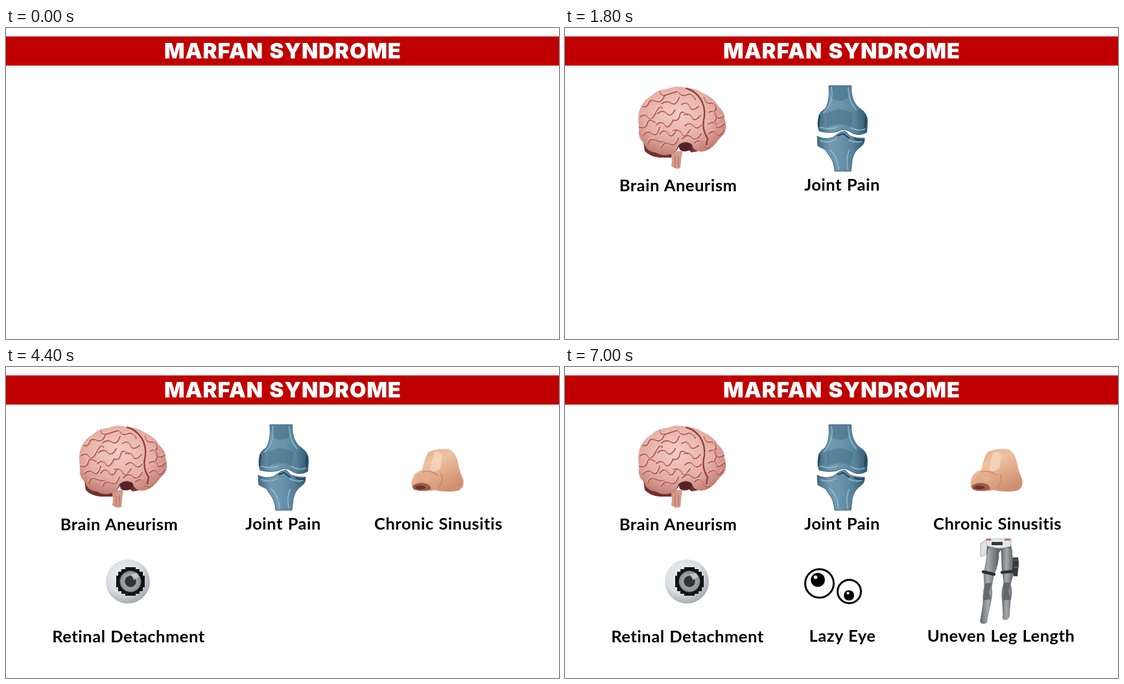
These frames come from a looping animation (853x480 px, 8 s). An HTML page:

```html
<!DOCTYPE html>
<html lang="en">
<head>
<meta charset="utf-8">
<title>Marfan syndrome</title>
<style>
  html, body { margin: 0; width: 100%; height: 100%; overflow: hidden; background: #fff; }
  svg { display: block; width: 100vw; height: 100vh; }
  text { text-anchor: middle; }
  .title { font: 900 33px Inter, sans-serif; letter-spacing: .9px; word-spacing: 2px; fill: #fff; }
  .label { font: 700 25.5px Lato, sans-serif; letter-spacing: .5px; word-spacing: 1px; }
  .line { fill: none; stroke-linecap: round; stroke-linejoin: round; }
  [data-at] { visibility: hidden; }
</style>
</head>
<body>
<svg viewBox="0 0 853 480">
  <defs>
    <radialGradient id="brainFill" cx=".45" cy=".38" r=".65">
      <stop offset="0" stop-color="#f3cdc3"/><stop offset=".6" stop-color="#e5b0a6"/><stop offset="1" stop-color="#bf7a70"/>
    </radialGradient>
    <linearGradient id="boneFill">
      <stop offset="0" stop-color="#3f6a84"/><stop offset=".25" stop-color="#7199b0"/>
      <stop offset=".5" stop-color="#6a94ac"/><stop offset=".75" stop-color="#56829c"/><stop offset="1" stop-color="#2f566f"/>
    </linearGradient>
    <linearGradient id="noseFill" x2=".6" y2="1">
      <stop offset="0" stop-color="#dba585"/><stop offset=".4" stop-color="#efc2a2"/><stop offset="1" stop-color="#d08f70"/>
    </linearGradient>
    <radialGradient id="noseTip">
      <stop offset="0" stop-color="#e8b292"/><stop offset="1" stop-color="#d6997a" stop-opacity="0"/>
    </radialGradient>
    <radialGradient id="ballFill" cx=".4" cy=".35" r=".65">
      <stop offset="0" stop-color="#eef0f3"/><stop offset=".65" stop-color="#d8dbe0"/><stop offset="1" stop-color="#a9adb4"/>
    </radialGradient>
    <radialGradient id="irisFill">
      <stop offset=".4" stop-color="#85898d"/><stop offset="1" stop-color="#34373a"/>
    </radialGradient>
    <linearGradient id="legFill">
      <stop offset="0" stop-color="#5f6469"/><stop offset=".4" stop-color="#a6abb0"/><stop offset="1" stop-color="#5b6065"/>
    </linearGradient>
    <clipPath id="brainClip"><use href="#brainShape"/></clipPath>
  </defs>

  <rect y="13" width="853" height="45" fill="#c00000"/>
  <text class="title" x="427" y="46.5">MARFAN SYNDROME</text>

  <g data-at="500">
    <path d="M121 176L123 190Q132 199 146 200L164 200L180 178L195 192L206 190L196 170Z" fill="#74302f"/>
    <path d="M163 190Q166 204 164 213Q170 219 178 216Q179 203 181 190Z" fill="#d39a8c"/>
    <path class="line" d="M170 199V215M175 199V214" stroke="#b0665c"/>
    <path id="brainShape" fill="url(#brainFill)" d="M113 141C113 124 121 111 134 104Q142 95 158 94Q170 88 186 92Q202 93 212 100Q229 107 236 120Q247 130 246 140Q251 154 245 164Q238 170 232 179Q222 190 210 191Q198 190 196 181Q185 173 176 180L169 193Q154 200 139 192Q126 191 122 178Q112 169 114 157Z"/>
    <g clip-path="url(#brainClip)">
      <g id="folds" class="line" stroke="#b45f5a" stroke-width="1.9">
        <path d="M120 121q7 2 9-5t11-3t13-8M146 98q2 8 11 5t16-5M116 137q7-6 12 1t12-7t10-7M115 153q10 3 12-6t12-1M121 165q7-8 14-2t11-10M128 179q2-10 12-6t13 2M143 132q8-7 14 0t13-6M141 149q8-7 13 1t13-8M146 164q7-10 13-1t12-5M149 184q5-10 13-5t13-9M149 117q8-6 15-1t12-9M166 142q9 3 11-7t12-1M167 158q9-3 13 5t13-6"/>
        <path d="M175 99q6 8 13 4t13 7M180 118q8-6 12 3t14 0M184 134q8-4 12 4t13-3M185 151q7-7 13 0t12-1M181 171q8-9 15-2t14-6M200 177q8-7 12 1t11 7M214 107q3 10 11 9t8 11M222 130q8-5 11 4t12 2M221 148q10-6 12 2t13-2M222 163q8-7 12 0t10-4M232 124q-3 8 0 12t-3 10"/>
      </g>
      <use href="#folds" x="-1.5" y="-2" opacity=".35" style="filter:brightness(2.2)"/>
      <path class="line" d="M187 93C207 99 217 117 215 137Q210 155 220 170L218 180" stroke="#963f40" stroke-width="2.4"/>
    </g>
    <path d="M175 181Q186 172 196 180L193 188Q184 193 177 188Z" fill="#552329"/>
    <text class="label" x="174.5" y="252">Brain Aneurism</text>
  </g>

  <g data-at="1800">
    <g fill="url(#boneFill)" stroke="#3a637c">
      <path d="M407 89H441.5C441 108 447 119 456 125Q467 132 466.500 145L465.500 161Q455 167 445 163L436 158Q428 155 420 160Q405 163 392 159Q388 148 392 134Q395 128 401 125Q409 115 407 89Z"/>
      <path d="M389 167Q400 173 413 169L424 161L432 159L440 167Q452 171 462 170Q463 179 455 184Q446 190 443 203L441 221H416Q415 205 407 196L402 188L390 182Z"/>
    </g>
    <path d="M407 89H441L437 108Q424 116 411 109Z" fill="#3f6c87" opacity=".5"/>
    <path d="M404 132Q422 119 444 132L441 152Q423 145 404 153Z" fill="#3c6882" opacity=".45"/>
    <path class="line" d="M411 92Q415 116 399 131M437 92Q437 113 449 126M394 153Q408 158 420 153M441 154Q453 160 462 156M394 174Q406 179 418 172M438 173Q448 178 458 175M409 188Q420 198 422 218M438 189Q433 202 436 218" stroke="#a4c5d5" stroke-width="2" opacity=".65"/>
    <path class="line" d="M421 166L429 163L438 170M393 136L391 152M464 137L463 153M447 171Q455 174 460 173" stroke="#203f55" stroke-width="2"/>
    <text class="label" x="427.500" y="251">Joint Pain</text>
  </g>

  <g data-at="3100">
    <path d="M651 132Q665 125 684 127Q693 131 697 146Q699 160 705 173Q708 186 697 191Q681 194 661 190Q642 194 629 189Q623 184 627 172Q630 162 642 159Q645 143 651 132Z" fill="url(#noseFill)"/>
    <ellipse cx="649" cy="172" rx="21" ry="13" fill="url(#noseTip)"/>
    <path d="M660 132Q669 129 673 135L670 157Q659 165 654 158Z" fill="#fae0c9" opacity=".6"/>
    <path class="line" d="M671 165Q676 177 667 186M642 162Q654 158 666 167" stroke="#c78665" stroke-width="2" opacity=".65"/>
    <path d="M627 184Q634 177 648 180Q657 183 655 189Q640 193 629 189Z" fill="#9d5947"/>
    <ellipse cx="639" cy="186" rx="8" ry="3" fill="#693428"/>
    <text class="label" x="667" y="251">Chronic Sinusitis</text>
  </g>

  <g data-at="4400">
    <circle cx="188" cy="331" r="34" fill="url(#ballFill)"/>
    <path d="M184 309h16v3h6v4h5v6h3v18h-3v6h-5v4h-6v3h-16v-3h-6v-4h-5v-6h-3v-18h3v-6h5v-4h6Z" fill="#101214"/>
    <circle cx="192" cy="331" r="17" fill="url(#irisFill)"/>
    <circle class="line" cx="192" cy="331" r="12.500" stroke="#b9bdc0" stroke-width="7" stroke-dasharray=".8 3.2" stroke-linecap="butt" opacity=".65"/>
    <circle cx="192" cy="331" r="8.500" fill="#303337"/>
    <path d="M193 320l9-2 3 6-8 5Z" fill="#d2d6da" opacity=".75"/>
    <text class="label" x="189" y="425">Retinal Detachment</text>
  </g>

  <g data-at="5700">
    <g fill="#fff" stroke="#000" stroke-width="3">
      <circle cx="392.500" cy="334" r="22"/>
      <circle cx="438.500" cy="346.500" r="18"/>
    </g>
    <circle cx="390" cy="328.500" r="10.800"/>
    <circle cx="438" cy="352.500" r="8"/>
    <g fill="#fff">
      <circle cx="386.500" cy="324.500" r="2.800"/>
      <circle cx="436.500" cy="349" r="2"/>
    </g>
    <text class="label" x="428" y="424">Lazy Eye</text>
  </g>

  <g data-at="7000">
    <path d="M641 273L650 267L653 288L641 293Z" fill="#e1e2e3" stroke="#a4a7aa"/>
    <path d="M651 274H688L690 286L677 290L672 283L667 290L650 288Z" fill="#63686d"/>
    <path d="M649 265H689L687 277Q669 283 651 276Z" fill="#e6e6e5" stroke="#a9aaab" stroke-width=".7"/>
    <path d="M650 265h7v3h-7ZM678 265h9v3h-9Z" fill="#b7755b"/>
    <path d="M658 270h17v5h-17Z" fill="#35393d"/>
    <g fill="url(#legFill)" stroke="#62676c" stroke-width=".7">
      <path d="M652 280Q661 275 669 285Q670 303 661 322L658 340Q660 352 656 366L651 389Q652 396 645 396Q639 395 641 390L645 365Q644 351 647 338L646 319Q650 302 652 280Z"/>
      <path d="M673 284Q682 274 689 283L692 309Q692 322 687 335Q691 348 687 361L685 385Q684 390 678 390Q674 389 676 382L674 355Q673 345 677 333L674 312Z"/>
    </g>
    <path d="M648 334L658 333L654 348L657 358L646 360ZM677 332L687 333L684 346L687 359L676 360Z" fill="#4f565e" opacity=".75"/>
    <path class="line" d="M645 316L662 320M674 317L695 315" stroke="#292d31" stroke-width="4.500"/>
    <path d="M691 294h8l1 10-2 19h-6l-2-8Z" fill="#343a40"/>
    <path d="M692 298h6M692 309h6" stroke="#858b90"/>
    <text class="label" x="672.500" y="424">Uneven Leg Length</text>
  </g>
</svg>
<script>
  const LOOP = 8000;
  const items = [...document.querySelectorAll('[data-at]')];

  function draw() {
    const time = performance.now() % LOOP;
    for (const item of items) {
      item.style.visibility = time >= Number(item.dataset.at) ? 'visible' : 'hidden';
    }
    requestAnimationFrame(draw);
  }
  draw();
</script>
</body>
</html>
```
